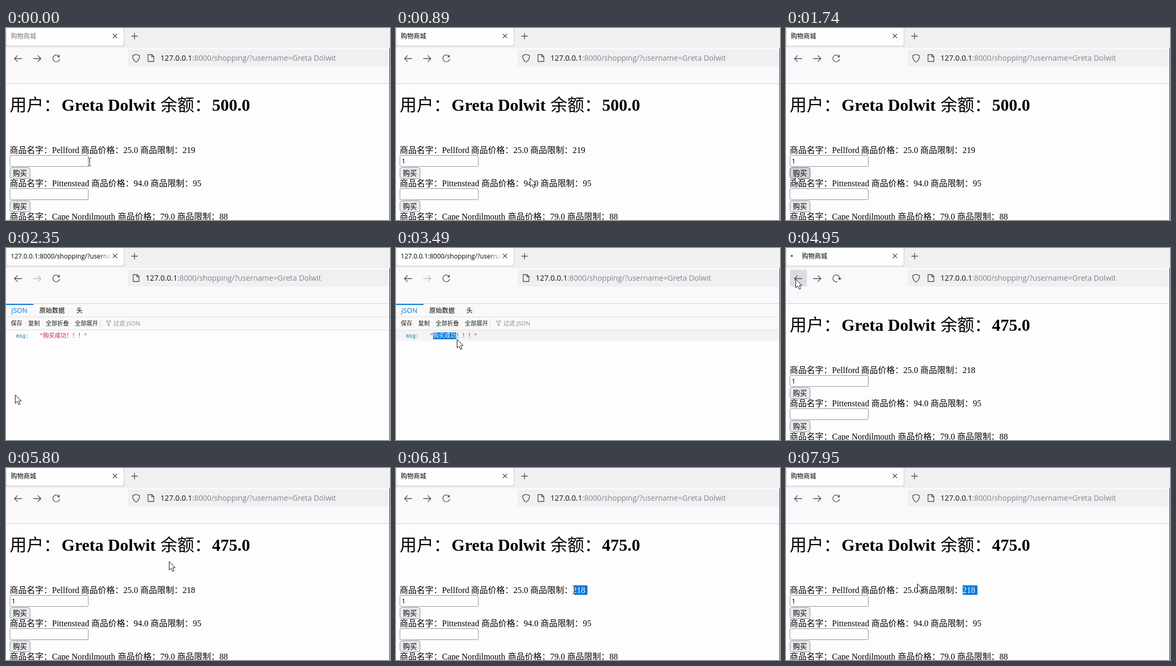
Write an HTML page that moves like this. It is 726x364 px and loops after 7.99 s.

```html
<!DOCTYPE html>
<html lang="zh-CN">
<head>
<meta charset="utf-8">
<title>购物商城</title>
<style>
  html, body { margin: 0; width: 100%; height: 100%; overflow: hidden; background: #fdfdfd; }
  svg { display: block; }
  text { white-space: pre; }
  .ui { font-family: "Open Sans", "Noto Sans CJK SC", sans-serif; }
  .page { font-family: "Liberation Serif", "Noto Sans CJK SC", serif; font-size: 16px; }
  .cjk { font-family: "Noto Sans CJK SC", sans-serif; font-weight: 500; }
  .mono { font-family: "Liberation Mono", "Noto Sans CJK SC", monospace; font-size: 10px; }
  .head { font-size: 32px; font-weight: bold; }
  .url { font-size: 14.2px; fill: #85858a; }
  .line { fill: none; stroke: #4a4a50; stroke-width: 1.3; }
</style>
</head>
<body>
<svg width="726" height="364" viewBox="0 0 726 364">
  <defs>
    <linearGradient id="fade" x1="176" x2="200" gradientUnits="userSpaceOnUse">
      <stop offset="0" stop-color="#fff"/><stop offset="1" stop-color="#fff" stop-opacity="0"/>
    </linearGradient>
    <mask id="tabMask" maskUnits="userSpaceOnUse" x="0" y="0" width="200" height="34">
      <rect width="200" height="34" fill="url(#fade)"/>
    </mask>
    <path id="doc" class="line" d="M-5.5-6.5H2L5.5-3V6.5H-5.5ZM1.5-6.5V-2.5H5.5"/>
    <path id="arrow" class="line" d="M7.5 0H-7M-1-6L-7 0L-1 6"/>
  </defs>

  <!-- browser frame -->
  <rect width="726" height="38" fill="#f0f0f0"/>
  <rect y="38" width="726" height="67" fill="#f9f9fb"/>
  <rect x="-5" y="-5" width="229" height="40" rx="4" fill="#d6d6da"/>
  <rect x="1" y="-5" width="221.5" height="38.5" rx="4" fill="#fefefe"/>
  <g mask="url(#tabMask)"><text id="tab" class="ui" y="19.5"></text></g>
  <circle id="dot" cy="15" r="2" fill="#55555a"/>
  <path class="line" d="M202 11l8 8m0-8l-8 8M237 15.5h12m-6-6v12"/>
  <rect id="hover" x="7.5" y="41" width="32" height="32" rx="4" fill="#dcdce0"/>
  <use href="#arrow" x="23" y="58"/>
  <use id="forward" href="#arrow" transform="translate(59 58) scale(-1 1)"/>
  <g id="reload" class="line">
    <path d="M100.5 54A6.5 6.5 0 1 0 101.5 59"/>
    <path d="M101.5 50.5V55.5H96.5Z" fill="#4a4a50" stroke="none"/>
  </g>
  <g id="spin" class="line">
    <path d="M97 63.8A6.5 6.5 0 1 1 101.5 57"/>
    <path d="M98 57H105L101.5 61Z" fill="#4a4a50" stroke="none"/>
  </g>
  <rect x="230" y="41" width="496" height="32" fill="#f0f0f3"/>
  <path id="shield" class="line" d="M246 50l6.5 2.3c0 6-1.5 9.7-6.5 12.5c-5-2.8-6.5-6.5-6.5-12.5z"/>
  <use id="file" href="#doc" y="57"/>
  <text id="url" class="ui url" y="62"><tspan fill="#111">127.0.0.1</tspan>:8000/shopping/?username=Greta Dolwit</text>
  <rect y="105" width="726" height="1" fill="#cfcfd6"/>

  <g id="shop" class="page">
    <text class="head" y="157"><tspan class="cjk" x="7">用户：</tspan><tspan x="105">Greta Dolwit</tspan><tspan class="cjk" x="292">余额：</tspan><tspan id="money" x="389.5"></tspan></text>
    <g id="rows"></g>
    <text id="typed" class="ui" x="10.500" y="257" font-size="13.3">1</text>
    <g id="picked">
      <rect id="band" y="222.5" height="18" fill="#0078d7"/>
      <text id="pickedText" x="333.7" y="237" fill="#fff">218</text>
    </g>
  </g>

  <g id="json" class="ui">
    <rect y="106" width="726" height="49" fill="#f9f9fa"/>
    <rect y="106" width="52" height="2" fill="#0a78d8"/>
    <g font-size="12" font-weight="500">
      <text x="10" y="123" font-size="13" font-weight="400" fill="#0a74d8">JSON</text>
      <text x="63" y="123">原始数据</text><text x="133" y="123">头</text>
    </g>
    <path d="M0 130.5H726M0 155.5H726M178.5 136V150" stroke="#dedee2"/>
    <g font-size="11" fill="#222">
      <text x="9" y="147">保存</text><text x="42" y="147">复制</text>
      <text x="75" y="147">全部折叠</text><text x="130" y="147">全部展开</text>
      <text x="203" y="147" fill="#8c8c90">过滤 JSON</text>
    </g>
    <path class="line" style="stroke:#8c8c90;stroke-width:1" d="M189.5 138.5h9l-3.5 4.5v5l-2-1.5v-3.5z"/>
    <rect id="rowHover" y="156" width="726" height="20" fill="#f3f3f5"/>
    <rect id="mark" x="70" y="160" height="13" fill="#0078d7"/>
    <g class="mono">
      <text x="19" y="170" fill="#1878a0">msg:</text>
      <g fill="#cc1478">
        <text x="64" y="170">"</text><text x="147" y="170">"</text>
        <text id="value" y="170" font-size="11"></text>
      </g>
    </g>
  </g>

  <rect x="725" y="38" width="1" height="326" fill="#333"/>
  <path id="pointer" d="M.5.5V16.5L4.3 13L7 19.3L9.8 18L7.2 12H12Z" fill="#fff" stroke="#111"/>
  <path id="beam" d="M-3-7.5H-1L0-6.5L1-7.5H3M0-6.5V6.5M-3 7.5H-1L0 6.5L1 7.5H3" fill="none" stroke="#111"/>
</svg>
<script>
const LOOP = 7990;
const $ = id => document.getElementById(id);
const show = (id, on) => $(id).style.display = on ? '' : 'none';
const set = (id, key, value) => $(id).setAttribute(key, value);
const within = (t, a, b) => t >= a && t < b;
const clamp = (v, a, b) => Math.max(a, Math.min(b, v));

// name, price, stock, x of the price label
const goods = [
  ['Pellford', '25.0', '', 141.7],
  ['Pittenstead', '94.0', '95', 161.2],
  ['Cape Nordilmouth', '79.0', '88', 211.4]
];
$('rows').innerHTML = goods.map(([name, price, stock, x], i) => `
  <g transform="translate(0 ${i * 63})">
    <text x="7" y="237">商品名字：${name}<tspan x="${x}">商品价格：${price} 商品限制：<tspan id="stock${i}">${stock}</tspan></tspan></text>
    <rect x="7.5" y="241.5" width="148" height="21" rx="2" fill="#fefefe" stroke="#8f8f9d"/>
    <rect id="buy${i}" x="7.5" y="264.5" width="38" height="21" rx="4" fill="#e9e9ed" stroke="#8f8f9d"/>
    <text class="ui" x="13" y="280" font-size="13.3">购买</text>
  </g>`).join('');

$('value').innerHTML = [...'购买成功！！！'].map((c, i) =>
  `<tspan id="ch${i}" x="${70 + i * 11}">${c}</tspan>`).join('');

// time, x, y of the mouse
const path = [
  [0, 158, 254], [40, 158, 254], [300, 150, 253], [560, 154, 254], [810, 218, 275],
  [960, 281, 291], [1460, 17, 279], [2470, 17, 278], [2920, 69, 167], [3200, 70, 167],
  [3490, 115, 173], [3700, 150, 179], [3970, 173, 104], [4300, 18, 59], [4950, 18, 59],
  [5680, 308, 177], [5800, 308, 177], [6150, 417, 215], [6490, 363, 231], [6530, 362, 231],
  [6890, 334, 231], [7050, 334, 231], [7820, 240, 227], [7949, 240, 227], [7950, 248, 219],
  [LOOP, 248, 219]
];

function mouse(t) {
  const i = path.findIndex(p => p[0] > t);
  const [t0, x0, y0] = path[i - 1], [t1, x1, y1] = path[i];
  const u = (t - t0) / (t1 - t0), e = u * u * (3 - 2 * u);
  return [x0 + (x1 - x0) * e, y0 + (y1 - y0) * e];
}

function draw(t) {
  const [x, y] = mouse(t);
  const json = within(t, 1900, 4910);
  const bought = t >= 4910;
  const loading = within(t, 1780, 2020) || within(t, 4620, 5300);

  show('shop', !json);
  show('json', json);
  show('shield', !json);
  set('file', 'x', json ? 246 : 274);
  set('url', 'x', json ? 264 : 292);
  set('forward', 'opacity', json ? 0.35 : 1);

  $('tab').textContent = json ? '127.0.0.1:8000/shopping/?username=Greta' : '购物商城';
  set('tab', 'font-size', json ? 12.2 : 12);
  set('tab', 'font-weight', json || t < 300 ? 400 : 500);
  set('tab', 'x', loading ? 30 : 9);
  set('tab', 'fill', t < 300 ? '#77777c' : '#000');
  show('dot', loading);
  set('dot', 'cx', 11 + 4 * Math.sin((t - 4950) / 200));
  show('spin', loading);
  show('reload', !loading);
  show('hover', x > 7 && x < 40 && y > 41 && y < 73);

  $('money').textContent = bought ? '475.0' : '500.0';
  $('stock0').textContent = bought ? '218' : '219';
  show('typed', t >= 850);
  const over = x > 7 && x < 46 && y > 264 && y < 286;
  set('buy0', 'fill', over ? '#d0d0d7' : '#e9e9ed');
  set('buy0', 'stroke', over ? '#676774' : '#8f8f9d');

  const left = t < 6890 ? clamp(x, 334, 362) : 334;
  show('picked', t >= 6530);
  set('band', 'x', left);
  set('band', 'width', 362 - left);
  show('pickedText', left < 348);

  show('rowHover', y > 156 && y < 177);
  const chars = t < 3200 ? 0 : t < 3490 ? clamp(Math.round((x - 70) / 11), 0, 4) : 4;
  set('mark', 'width', chars * 11);
  for (let i = 0; i < 4; i++) set('ch' + i, 'fill', i < chars ? '#fff' : '#cc1478');

  const beam = t < 640 || within(t, 2880, 3440) || within(t, 6460, 7780);
  show('beam', beam);
  show('pointer', !beam);
  set(beam ? 'beam' : 'pointer', 'transform', `translate(${Math.round(x)} ${Math.round(y)})`);
}

const start = performance.now();
function tick() {
  draw((performance.now() - start) % LOOP);
  requestAnimationFrame(tick);
}
draw(0);
requestAnimationFrame(tick);
</script>
</body>
</html>
```
